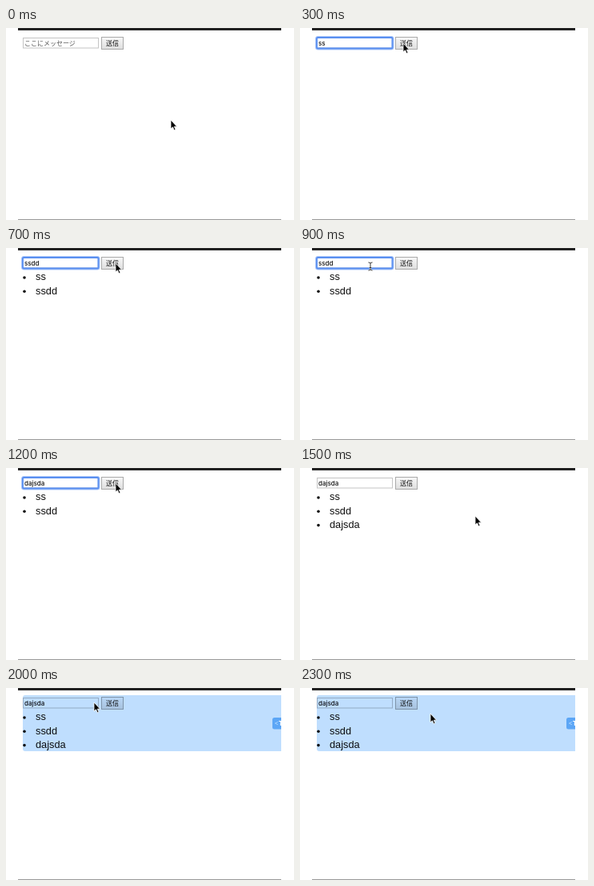
Recreate the animation shown at these times as an HTML page. Size 360 by 240 pixels, loop 2.4 s.

```html
<!DOCTYPE html>
<html lang="ja">
<head>
<meta charset="utf-8">
<title>Message form</title>
<style>
  html, body { margin: 0; width: 100%; height: 100%; overflow: hidden; background: #fff; }
  svg { display: block; width: 360px; height: 240px; }
  .field { font: 500 8px Inter, "Noto Sans CJK JP", "Noto Sans CJK", sans-serif; fill: #111; }
  .field.hint { font-weight: 400; fill: #555; }
  .label { font: 8px "Noto Sans CJK JP", "Noto Sans CJK", sans-serif; fill: #111; }
  .item { font: 12.8px "Liberation Sans", Arial, sans-serif; fill: #111; }
  .tag { font: 700 8px Inter, sans-serif; fill: #fff; }
  #tint { mix-blend-mode: multiply; }
</style>
</head>
<body>
<svg viewBox="0 0 360 240">
  <defs>
    <linearGradient id="face" x2="0" y2="1">
      <stop stop-color="#f7f7f7"/>
      <stop offset="1" stop-color="#dedede"/>
    </linearGradient>
    <clipPath id="page"><rect x="15" width="329" height="240"/></clipPath>
  </defs>
  <g clip-path="url(#page)">
    <rect x="15" width="329" height="3" fill="#222"/>
    <rect x="15" y="239" width="329" height="1" fill="#999"/>

    <rect x="21.5" y="12.5" width="94" height="12.5" fill="#fff" stroke="#c4c4c4"/>
    <g id="focus" fill="none">
      <rect x="20.5" y="11.5" width="95.5" height="14.5" rx="2" stroke="#a9c6fa" stroke-width="3"/>
      <rect x="21" y="12" width="94.5" height="13.5" rx="1" stroke="#5a8ff0" stroke-width="1.8"/>
    </g>
    <text id="field" class="field" x="23" y="21.6"></text>

    <rect x="119.5" y="11.5" width="27" height="15" fill="url(#face)" stroke="#aaa"/>
    <text class="label" x="125" y="21.9">送信</text>

    <g id="list"></g>
    <rect id="tint" x="21" y="9" width="330" height="70" rx="3" fill="#bfdefe"/>
    <g id="tag">
      <rect x="333" y="37" width="20" height="14.5" rx="2.5" fill="#5ca6f6"/>
      <text class="tag" x="335.5" y="47.2"><tspan fill="#bfe0ff" font-weight="400">&lt;</tspan>T</text>
    </g>

    <path id="arrow" d="M0 0V11L2.5 8.8L4.2 12.8L6 12L4.3 8.2H7.6Z"
          fill="#000" stroke="#fff" stroke-width=".8" stroke-linejoin="round"/>
    <g id="beam" fill="none">
      <path d="M-2.5 -5Q0 -5 0 -3.5Q0 -5 2.5 -5M0 -3.5V3.5M-2.5 5Q0 5 0 3.5Q0 5 2.5 5M-1.3 1.5H1.3"
            stroke="#fff" stroke-width="2"/>
      <path d="M-2.5 -5Q0 -5 0 -3.5Q0 -5 2.5 -5M0 -3.5V3.5M-2.5 5Q0 5 0 3.5Q0 5 2.5 5M-1.3 1.5H1.3"
            stroke="#222" stroke-width=".9"/>
    </g>
  </g>
</svg>
<script>
  const STEP = 100, LOOP = 2400;
  const $ = id => document.getElementById(id);
  const show = (el, on) => el.setAttribute("visibility", on ? "visible" : "hidden");

  // Latest entry at or before the given time: [time, value...]
  const at = (track, t) => track.filter(k => k[0] <= t).pop();

  const typed = [[0, ""], [200, "ss"], [500, "ssdd"], [1000, "da"], [1100, "dajsda"]];
  const items = [[400, "ss"], [700, "ssdd"], [1300, "dajsda"]];
  const pointer = [
    [0, "arrow", 206, 115], [100, "beam", 95, 22], [300, "arrow", 129, 19],
    [400, "arrow", 132, 19], [500, "beam", 95, 22], [600, "arrow", 137, 19],
    [800, "beam", 100, 22], [900, "beam", 88, 23], [1200, "arrow", 137, 19],
    [1400, "arrow", 180, 42], [1500, "arrow", 219, 60], [1600, "none", 0, 0],
    [1800, "arrow", 261, 56], [1900, "arrow", 200, 40], [2000, "arrow", 110, 18],
    [2100, "arrow", 40, 8], [2200, "arrow", 104, 20], [2300, "arrow", 163, 32]
  ];

  $("list").innerHTML = items.map(([, word], i) => {
    const y = i * 17.3;
    return `<g><circle cx="23" cy="${37 + y}" r="1.8" fill="#111"/>` +
           `<text class="item" x="37" y="${40.3 + y}">${word}</text></g>`;
  }).join("");
  const rows = [...$("list").children];

  function draw(now) {
    const t = Math.floor((now % LOOP) / STEP + 0.001) * STEP % LOOP;

    const word = at(typed, t)[1];
    $("field").textContent = word || "ここにメッセージ";
    $("field").classList.toggle("hint", !word);
    show($("focus"), t >= 100 && t < 1400);
    rows.forEach((row, i) => show(row, t >= items[i][0]));
    show($("tint"), t >= 1600);
    show($("tag"), t >= 1600);

    const [, kind, x, y] = at(pointer, t);
    for (const name of ["arrow", "beam"]) {
      show($(name), name === kind);
      $(name).setAttribute("transform", `translate(${x} ${y})`);
    }
  }

  const start = performance.now();
  function tick() {
    draw(performance.now() - start);
    requestAnimationFrame(tick);
  }
  tick();
</script>
</body>
</html>
```
